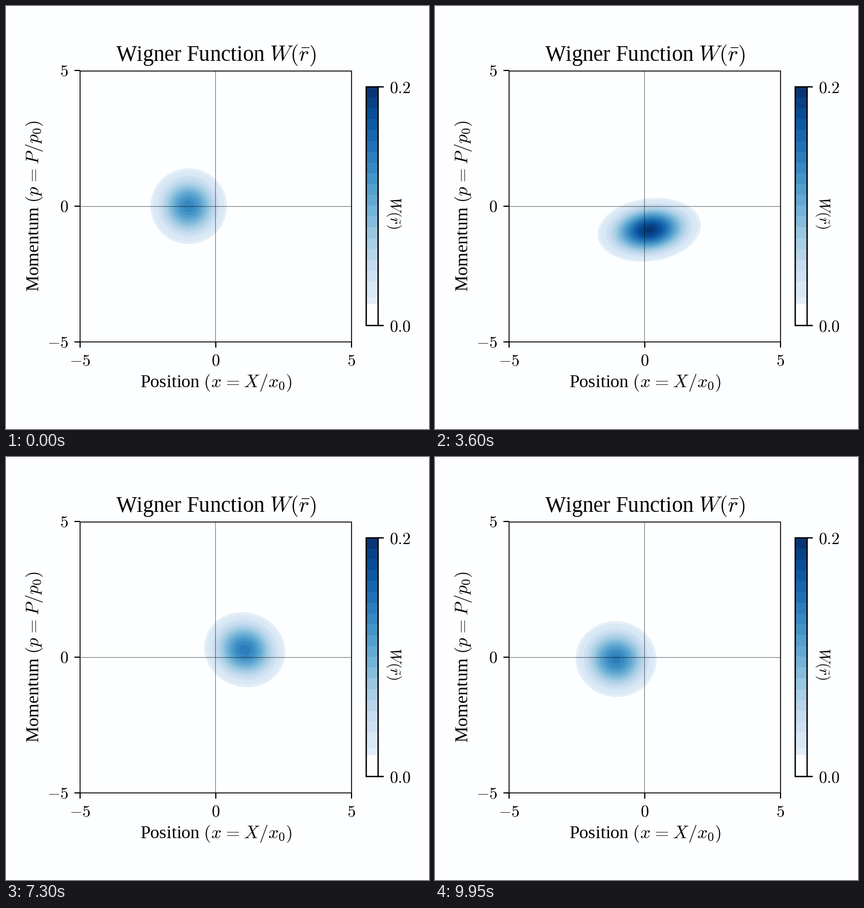
Animation of 748 by 748 pixels, one loop 10000 ms. Source, as a matplotlib script:

```python
import numpy as np
import matplotlib.pyplot as plt
from matplotlib.animation import FuncAnimation
from matplotlib.patches import Polygon, Rectangle

SIZE, DPI = 748, 100
FRAMES, INTERVAL = 200, 50
PERIOD = 5                     # seconds per turn
UNIT = 48                      # pixels per axis unit
CX, CY = 371, 354              # origin of the phase space
LEFT, RIGHT, TOP, BOTTOM = 131, 611, 114.7, 594
PAPER = "#fdfeff"

plt.rcParams["mathtext.fontset"] = "cm"
plt.rcParams["font.family"] = "Liberation Serif"

# Band edges as fractions of the colour scale: a thin rim, then even steps
EDGES = [0.09, 0.118, *np.linspace(0.185, 1, 19)]
COLORS = [plt.cm.Blues((a + b) / 2) for a, b in zip(EDGES, EDGES[1:])]

fig = plt.figure(figsize=(SIZE / DPI, SIZE / DPI), dpi=DPI, facecolor=PAPER)
ax = fig.add_axes([0, 0, 1, 1])
ax.set_xlim(0, SIZE)
ax.set_ylim(SIZE, 0)
ax.axis("off")


def pt(px):
    return px * 72 / DPI


def line(x0, y0, x1, y1, width, **kw):
    ax.plot([x0, x1], [y0, y1], color="black", lw=pt(width),
            solid_capstyle="butt", **kw)


def box(x0, y0, x1, y1, width):
    ax.add_patch(Rectangle((x0, y0), x1 - x0, y1 - y0, fill=False,
                           ec="black", lw=pt(width), zorder=6))


def label(x, y, text, size, ha="center", rotation=0):
    ax.text(x, y, text, fontsize=pt(size), ha=ha, va="baseline",
            rotation=rotation, rotation_mode="anchor", color="black")


def draw_plot_frame():
    line(CX - 0.6, TOP, CX - 0.6, BOTTOM, 1.2, alpha=0.5, zorder=5)
    line(LEFT, CY, RIGHT, CY, 1.2, alpha=0.5, zorder=5)
    box(LEFT, TOP, RIGHT, BOTTOM, 1.6)
    for value in (-5, 0, 5):
        x, y = CX + value * UNIT, CY - value * UNIT
        line(x, BOTTOM, x, BOTTOM + 10, 2)
        line(LEFT - 10, y, LEFT, y, 2)
        label(x, 636, f"${value}$", 29)
        label(110.5, y + 9.5, f"${value}$", 29, ha="right")


def draw_colorbar():
    left, right, top, bottom = 637, 658, 143, 565
    height = bottom - top
    for low, high, color in zip(EDGES, EDGES[1:], COLORS):
        ax.add_patch(Rectangle((left, bottom - high * height), right - left,
                               (high - low) * height, fc=color, lw=0,
                               antialiased=False))
    box(left, top, right, bottom, 2.4)
    for y, text in ((top, "$0.2$"), (bottom, "$0.0$")):
        line(right, y, 668, y, 2.4)
        label(678.5, y + 10, text, 29, ha="left")


def draw_labels():
    eq = r"\hspace{0.07}=\hspace{0.07}"
    label(371.5, 97, r"Wigner Function $W(\bar{r})$", 38.6)
    label(371.5, 673.5, f"Position $(x{eq}X/x_0)$", 32)
    label(57.5, 353.5, f"Momentum $(p{eq}P/p_0)$", 32, rotation=90)
    label(679, 366, r"$W(\tilde{r})$", 26.5, rotation=270)


def state(t):
    """Centre, half widths, correlation and peak of the packet at t seconds."""
    phi = 2 * np.pi * t / PERIOD
    cos1, cos2 = np.cos(phi), np.cos(2 * phi)
    x = CX - UNIT * (1 + 0.006 * t) * cos1 + 1.5 * (cos2 - cos1 ** 2 * cos1)
    y = CY - UNIT * (0.94 * np.sin(phi) + 0.06 * np.sin(3 * phi))
    w = 80.5 - (13 - 0.4 * t) * cos2
    h = 61.5 + 5.5 * cos2
    corr = 0.25 * np.sin(2 * phi) - 0.07 * np.sin(4 * phi)
    peak = 0.82 - 0.15 * cos2 + 0.003 * t
    return x, y, w, h, corr, peak


angle = np.linspace(0, 2 * np.pi, 160, endpoint=False)
COS, SIN = np.cos(angle), np.sin(angle)

bands = [ax.add_patch(Polygon(np.zeros((3, 2)), fc=color, lw=0, zorder=2))
         for color in COLORS]


def update(frame):
    x, y, w, h, corr, peak = state(frame * INTERVAL / 1000)
    ring_y = corr * COS + np.sqrt(1 - corr ** 2) * SIN
    for level, band in zip(EDGES, bands):
        band.set_visible(level < peak)
        if level < peak:
            s = np.sqrt(np.log(peak / level) / np.log(peak / EDGES[0]))
            band.set_xy(np.column_stack((x + s * w * COS, y - s * h * ring_y)))
    return bands


draw_plot_frame()
draw_colorbar()
draw_labels()

anim = FuncAnimation(fig, update, frames=FRAMES, interval=INTERVAL,
                     repeat=True, repeat_delay=0, blit=False)
plt.show()
```
